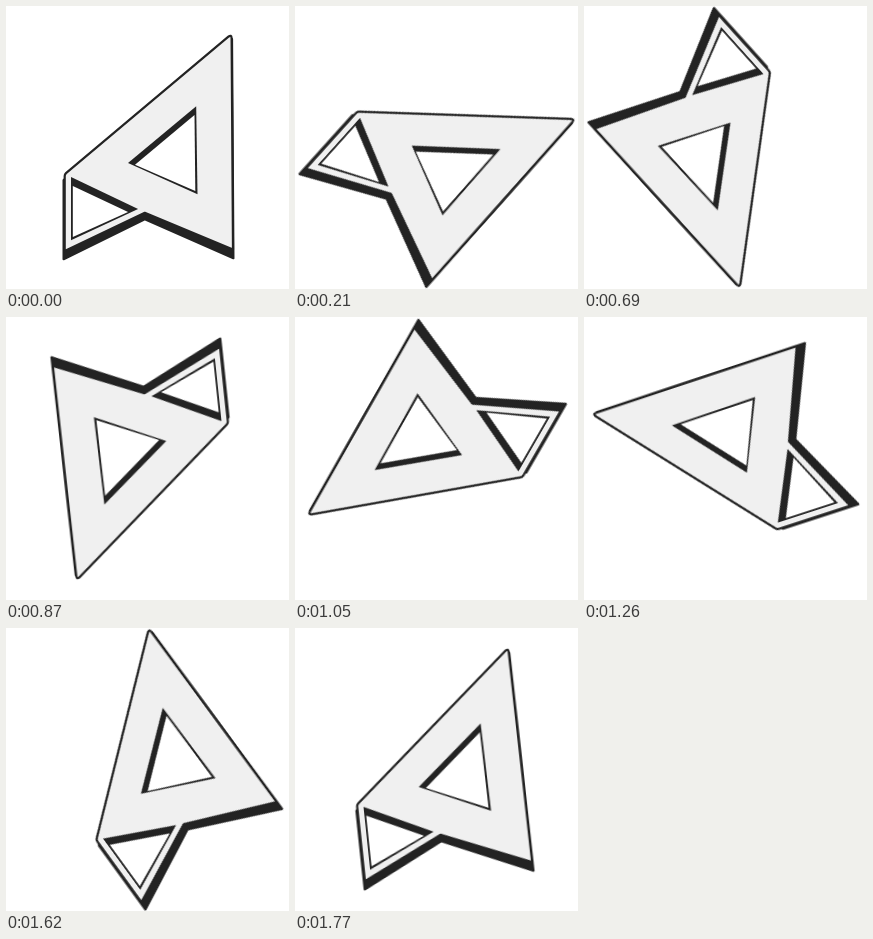
These frames come from a looping animation (283 px wide and 283 px high, 1.8 s). An HTML page:

```html
<!DOCTYPE html>
<html lang="en">
<head>
<meta charset="utf-8">
<title>Turning set square</title>
<style>
  html, body { margin: 0; width: 100%; height: 100%; overflow: hidden; background: #fff; }
  svg { display: block; width: 100%; height: 100%; }
  .piece { transform-origin: 142px 141.5px; animation: turn 1800ms steps(60) infinite; }
  .edge, .face { stroke: #232323; stroke-width: 2.2; stroke-linejoin: round; }
  .edge, .wall { fill: #232323; }
  .face { fill: #f0f0f0; }
  .gap { fill: #fff; }
  @keyframes turn { to { transform: rotate(360deg); } }
</style>
</head>
<body>
<svg viewBox="0 0 283 283">
  <g class="piece">
    <path class="edge" d="M57.6 174V253.2L138.8 213.2L227.4 252.2L226 33Z"/>
    <path class="face" d="M58.7 170Q58.7 168.3 60 167.1L222.4 30.7Q225.4 28.4 225.6 32L227 243.5L138.8 206.8L58.7 245Z"/>
    <!-- upper opening -->
    <path class="wall" d="M122 157L190.2 100.3L191.5 188.2Z"/>
    <path class="gap" d="M129 158.7L188.5 108.9L189.3 184.9Z"/>
    <!-- lower opening -->
    <path class="wall" d="M65 171L132.1 203L65 234.2Z"/>
    <path class="gap" d="M66.8 180L122.1 206L66.8 231.1Z"/>
  </g>
</svg>
</body>
</html>
```
